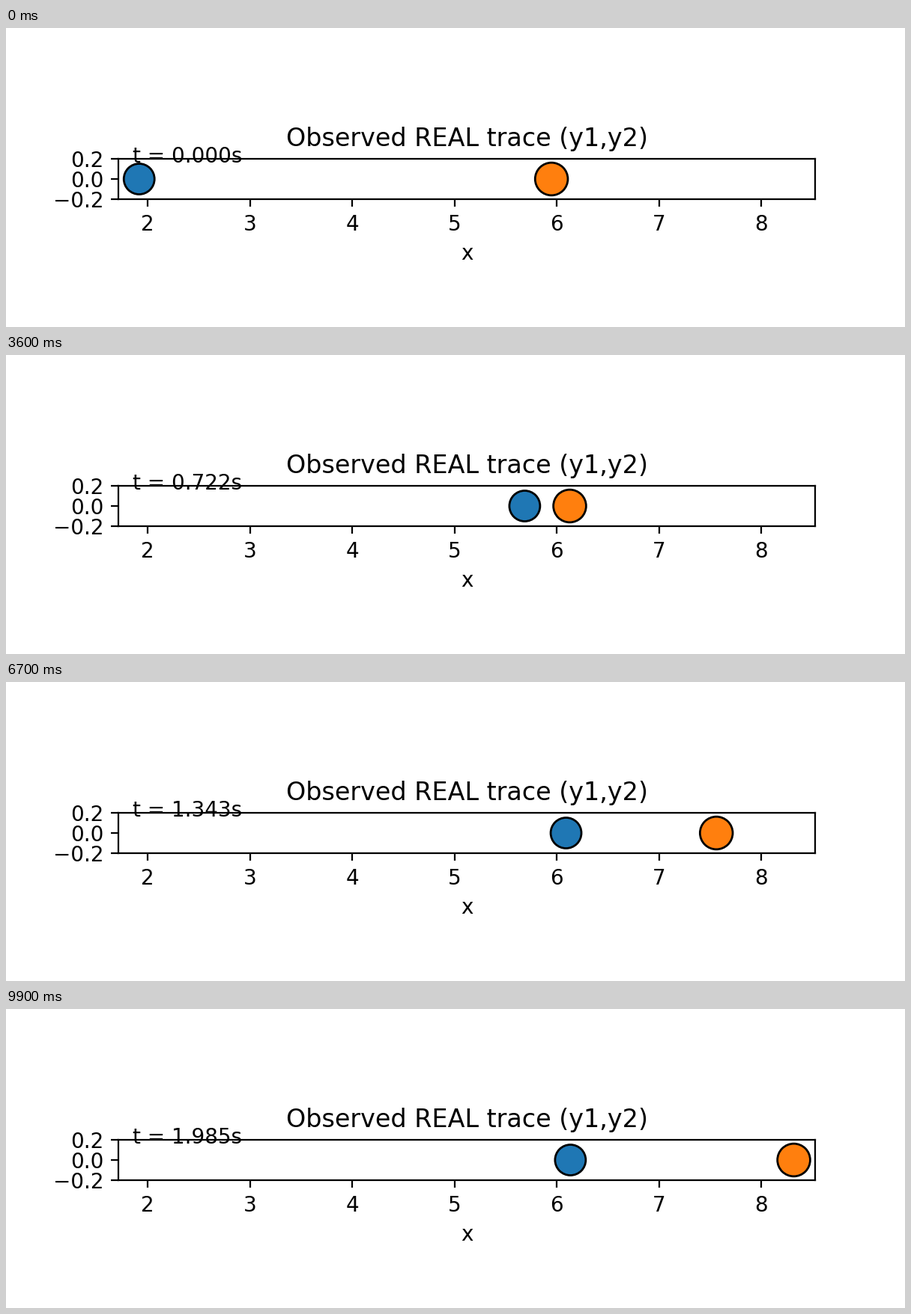
Write a matplotlib script that moves like this. It is 1200 px wide and 400 px high and loops after 10 s.

```python
import numpy as np
import matplotlib.pyplot as plt
from matplotlib.animation import FuncAnimation
from matplotlib.patches import Circle

N = 100
t = np.linspace(0, 2, 400)[::4]
T_HIT = 0.6657   # moment of collision
T_STOP = 1.630   # moment the first ball comes to rest

# First ball: slows under friction, is hit back, then glides to a stop.
y1 = np.where(
    t < T_HIT,
    1.9137 + 6.374 * t - 1.1805 * t**2,
    6.132 - 0.5358 * np.maximum(T_STOP - t, 0) ** 2,
)

# Second ball: at rest until the hit, then a smooth slowing glide.
knots_t = [0.6657, 0.7218, 0.8822, 1.0827, 1.3233, 1.5439, 1.7043, 1.7644, 1.9850]
knots_x = [5.949, 6.128, 6.586, 7.056, 7.516, 7.860, 8.052, 8.124, 8.312]
glide = np.poly1d(np.polyfit(knots_t, knots_x, 3))
y2 = np.where(t < T_HIT, 5.948, glide(t))

# Slight measurement jitter
rng = np.random.default_rng(3)
y1 = y1 + rng.normal(0, 0.0015, N)
y2 = y2 + rng.normal(0, 0.002, N)

plt.rcParams["font.family"] = "DejaVu Sans"
fig, ax = plt.subplots(figsize=(6, 2), dpi=200)
ax.set_aspect("equal")
ax.set_xlim(1.7137, 8.5244)
ax.set_ylim(-0.2, 0.2)
ax.set_xticks(range(2, 9))
ax.set_yticks([-0.2, 0.0, 0.2])
ax.set_xlabel("x")
ax.set_title("Observed REAL trace (y1,y2)")


def ball(x, radius, color):
    return ax.add_patch(Circle((x, 0), radius, facecolor=color, edgecolor="black"))


ball1 = ball(y1[0], 0.15, "tab:blue")
ball2 = ball(y2[0], 0.16, "tab:orange")
clock = ax.text(0.02, 0.9, "", transform=ax.transAxes)


def update(i):
    ball1.center = (y1[i], 0)
    ball2.center = (y2[i], 0)
    clock.set_text(f"t = {t[i]:.3f}s")
    return ball1, ball2, clock


anim = FuncAnimation(fig, update, frames=N, interval=100, repeat=True, repeat_delay=0)
plt.show()
```
